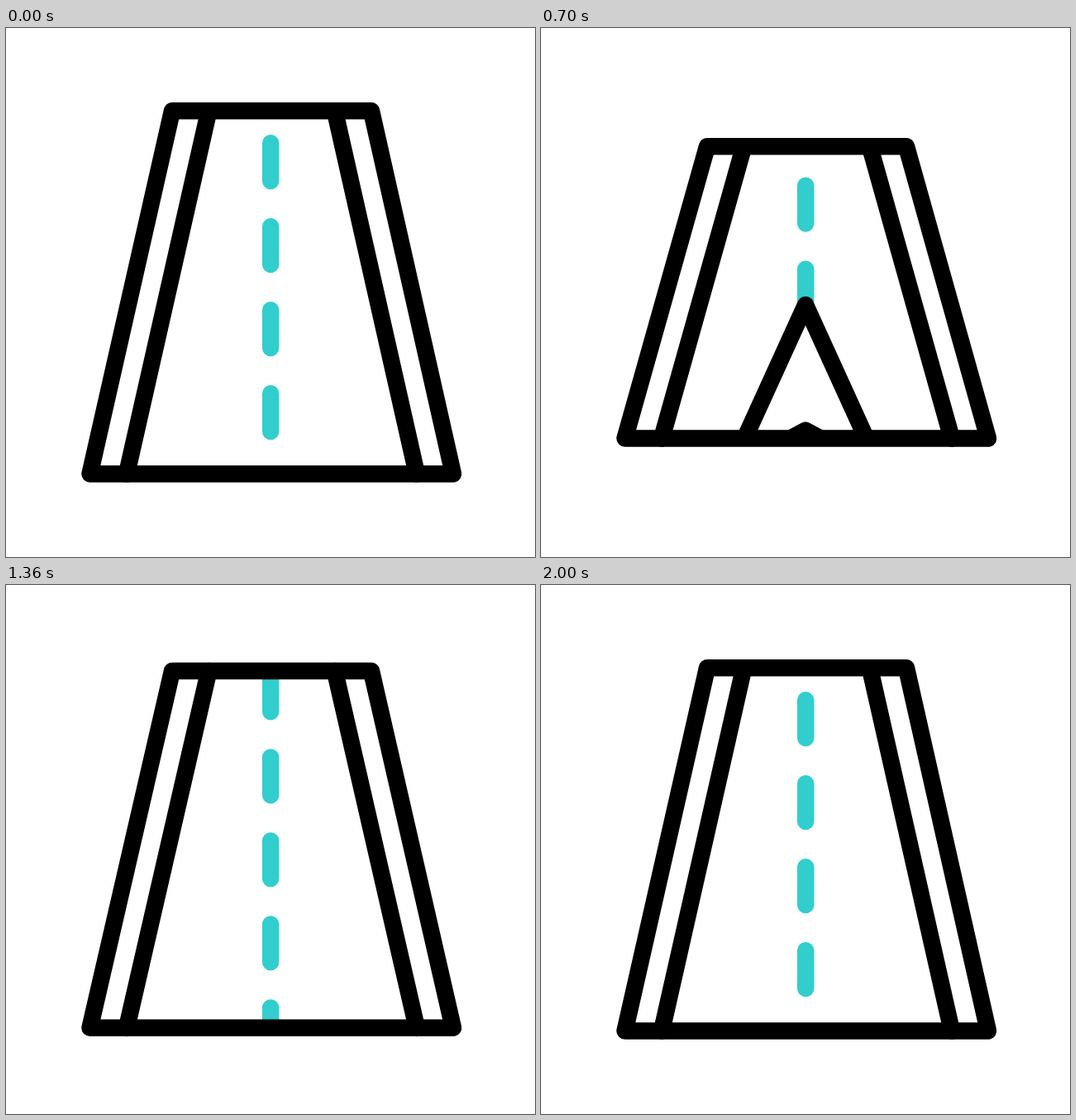
Animation, 640 px wide and 640 px high, one loop 2.2 s. Source, as an HTML page with a canvas:

```html
<!DOCTYPE html>
<html lang="en">
<head>
<meta charset="utf-8">
<title>Road</title>
<style>
html, body { margin: 0; width: 100%; height: 100%; overflow: hidden; background: #fff; }
canvas { display: block; width: 640px; height: 640px; }
</style>
</head>
<body>
<canvas id="stage" width="640" height="640"></canvas>
<script>
const ctx = document.getElementById('stage').getContext('2d');
const LOOP = 2200, STEP = 20;
const TOP = 100.3, BOTTOM = 539.5, WIDTH = 20.5;
const BLACK = '#000', TEAL = '#32cece';

// Piecewise smoothstep through [time, value] keys
function ease(keys, t) {
  if (t <= keys[0][0]) return keys[0][1];
  for (let i = 1; i < keys.length; i++) {
    const [t0, a] = keys[i - 1], [t1, b] = keys[i];
    if (t < t1) {
      const u = (t - t0) / (t1 - t0);
      return a + (b - a) * u * u * (3 - 2 * u);
    }
  }
  return keys[keys.length - 1][1];
}

const squeezeKeys = [[200, 0], [900, 53.5], [1600, -15], [2000, 0]];
const dashKeys = [[200, 0], [2000, 808]];
const arrowKeys = [[360, 561], [1240, -119]];

function trace(points, closed) {
  ctx.beginPath();
  points.forEach(([x, y]) => ctx.lineTo(x, y));
  if (closed) ctx.closePath();
}

function stroke(points, color, closed) {
  trace(points, closed);
  ctx.strokeStyle = color;
  ctx.stroke();
}

function drawDashes(shift) {
  const pitch = 101;
  for (let y = 139.3 + shift % pitch - 2 * pitch; y < 600; y += pitch) {
    stroke([[320.2, y], [320.2, y + 45.8]], TEAL);
  }
}

function drawArrow(y) {
  const points = [[320, y], [411, y + 200], [320, y + 152], [229, y + 200]];
  trace(points, true);
  ctx.fillStyle = '#fff';
  ctx.fill();
  stroke(points, BLACK, true);
}

function draw(t) {
  const squeeze = ease(squeezeKeys, t);
  const top = TOP + squeeze, bottom = BOTTOM - squeeze;
  const road = [[201, top], [442, top], [541, bottom], [101.5, bottom]];

  ctx.fillStyle = '#fff';
  ctx.fillRect(0, 0, 640, 640);
  ctx.lineWidth = WIDTH;
  ctx.lineCap = ctx.lineJoin = 'round';

  ctx.save();
  trace(road, true);
  ctx.clip();
  drawDashes(ease(dashKeys, t));
  drawArrow(ease(arrowKeys, t));
  ctx.restore();

  stroke([[245.4, top], [146, bottom]], BLACK);
  stroke([[397.8, top], [497, bottom]], BLACK);
  stroke(road, BLACK, true);
}

function tick() {
  const t = performance.now() % LOOP;
  draw(Math.floor(t / STEP) * STEP);
  requestAnimationFrame(tick);
}
draw(0);
requestAnimationFrame(tick);
</script>
</body>
</html>
```
